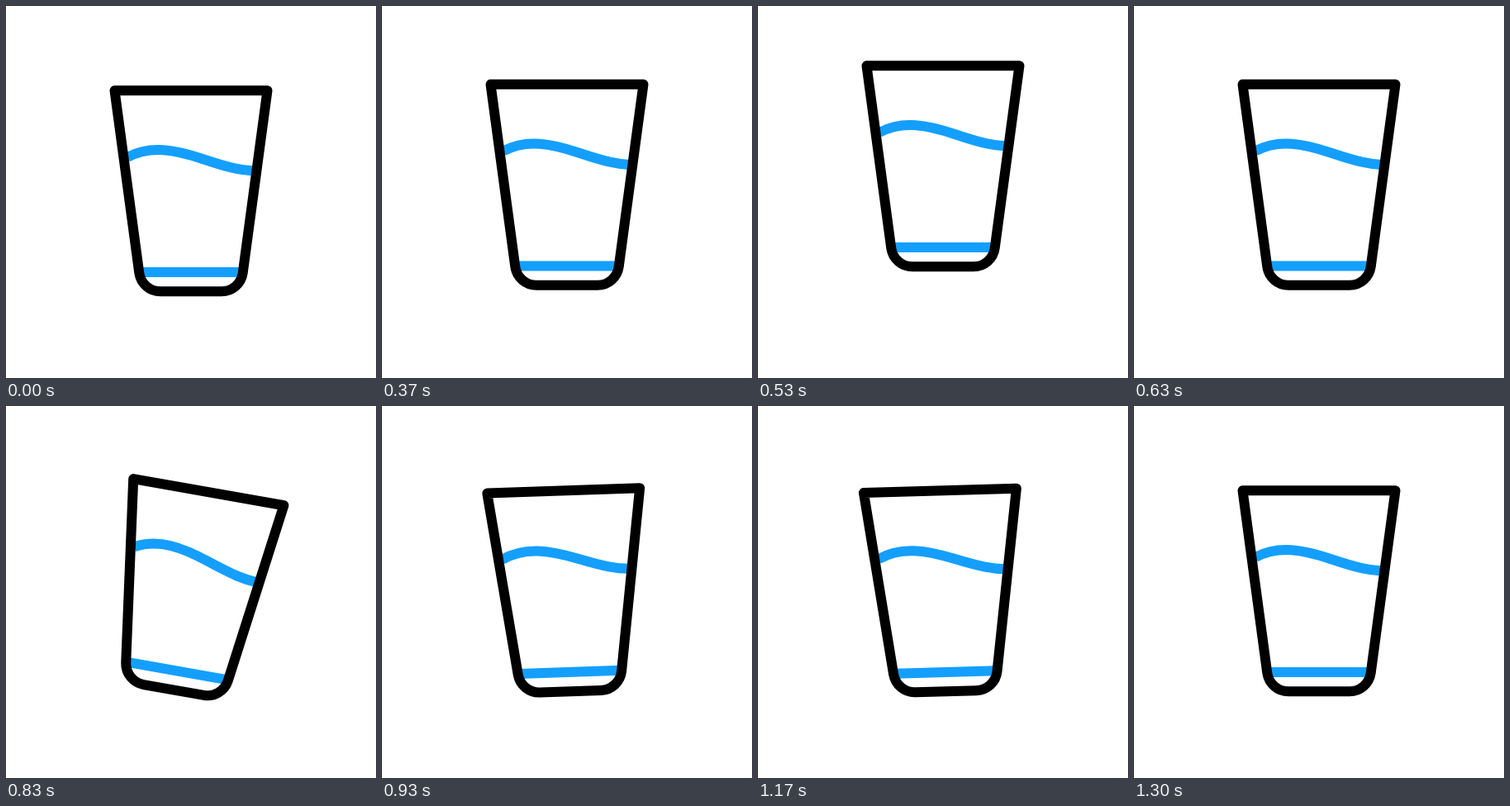
An HTML page for the animation above (1330 ms loop, 448 by 450 pixels).

```html
<!DOCTYPE html>
<html lang="en">
<head>
<meta charset="utf-8">
<title>Glass of water</title>
<style>
  html, body { margin: 0; width: 100%; height: 100%; overflow: hidden; background: #fff; }
  svg { display: block; width: 448px; height: 450px; }
</style>
</head>
<body>
<svg viewBox="0 0 448 450" fill="none" stroke-width="12">
  <g id="glass">
    <g stroke="#149fff">
      <path d="M147 183C175 168 205 174 238 185S285 199 300 199.5"/>
      <path d="M163 322H285"/>
    </g>
    <path stroke="#000" stroke-linejoin="round"
      d="M131.5 102.3H316.5L286.7 323A26 26 0 0 1 261 345.3H187A26 26 0 0 1 161.3 323Z"/>
  </g>
</svg>
<script>
  const LOOP = 1330;
  const glass = document.getElementById('glass');

  // Keys are [step, value], with 30 steps per second
  const lift = [[10, 0], [15, -37.5], [20, 0]];
  const tilt = [[20, 0], [25, 10], [30, -10], [33, 5], [36, -5], [39, 0]];

  function valueAt(keys, step) {
    const next = keys.findIndex(([at]) => at > step);
    if (next <= 0) return 0;
    const [from, a] = keys[next - 1];
    const [to, b] = keys[next];
    return a + (b - a) * (step - from) / (to - from);
  }

  // Steps begin on whole hundredths of a second
  const stepAt = ms => Math.floor((Math.floor(ms / 10) + 0.5) * 0.3);

  function render(ms) {
    const step = stepAt(ms % LOOP);
    glass.setAttribute('transform',
      `translate(0 ${valueAt(lift, step)}) rotate(${valueAt(tilt, step)} 224 225)`);
  }

  const start = performance.now();
  function tick() {
    render(performance.now() - start);
    requestAnimationFrame(tick);
  }
  tick();
</script>
</body>
</html>
```
